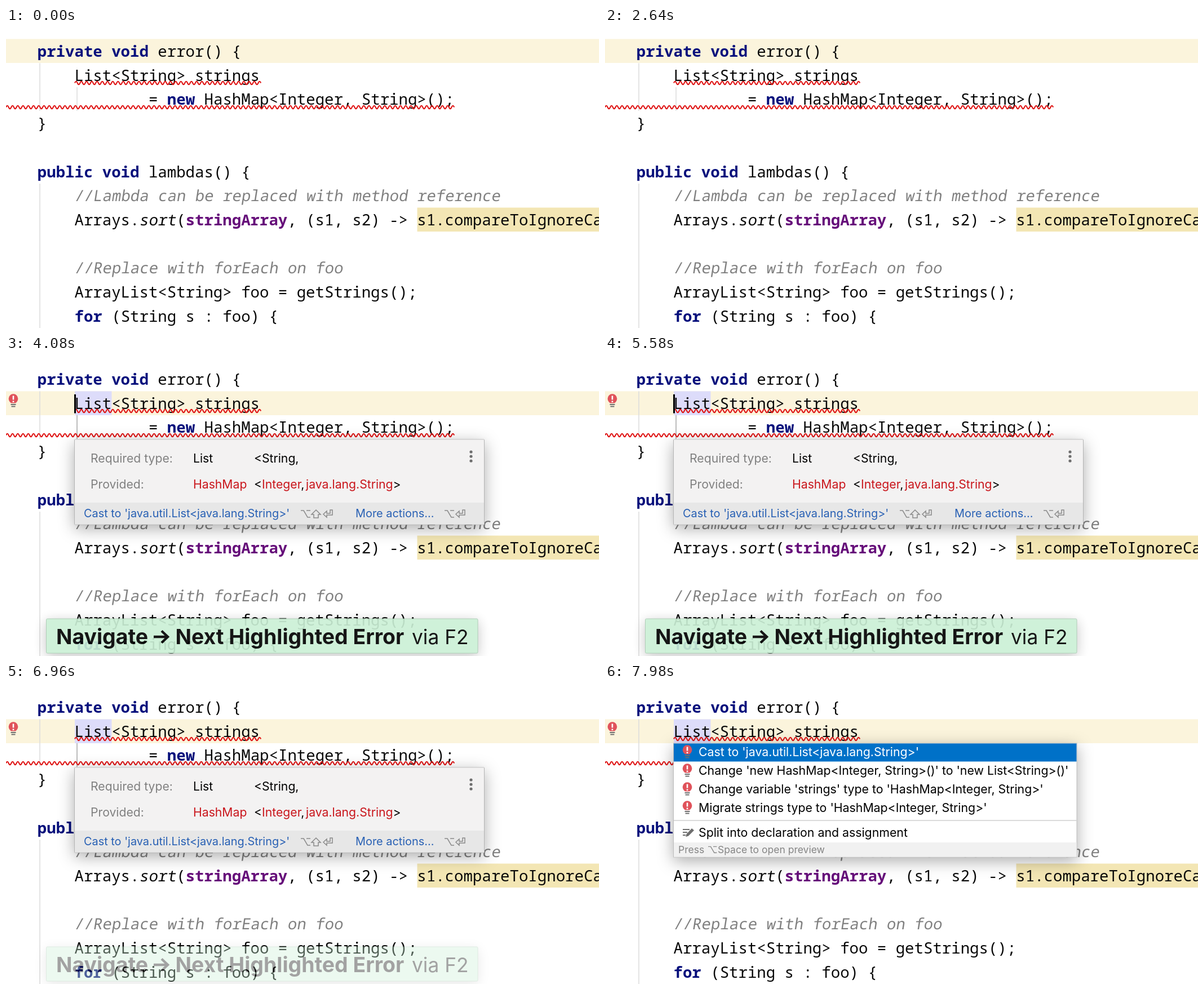
An HTML page that plays this animation: 1052 by 532 pixels, repeating every 8000 ms.

```html
<!DOCTYPE html>
<html lang="en">
<head>
<meta charset="utf-8">
<title>Editor: next highlighted error</title>
<style>
  html, body { margin: 0; width: 100%; height: 100%; overflow: hidden; background: #fff; }
  svg { display: block; width: 1052px; height: 532px; }
  text { white-space: pre; font-family: Inter, "Open Sans", sans-serif; }
  #code text { font: 500 27.38px "Noto Sans Mono", "DejaVu Sans Mono", monospace; fill: #080808; }
  #code .k { font-weight: 700; fill: #07107c; }
  #code .f { font-weight: 700; fill: #660e7a; }
  #code .c { fill: #808080; }
  .guide { stroke: #dcdcdc; stroke-width: 1.5; }
  .wave { fill: none; stroke: #df1515; stroke-width: 2.1; }
  .popup { filter: drop-shadow(0 7px 14px rgba(0, 0, 0, .32)); }
  .keys { fill: none; stroke: #8a8a8a; stroke-width: 1.5; }
  #hint text { font-size: 21.2px; }
  #hint .link { font-size: 19.9px; fill: #2860b4; }
  .dim { fill: #808080; }
  .red { fill: #c9151b; }
  #menu text { font-size: 21.3px; }
  #menu .foot { font-size: 17.5px; fill: #858585; }
  #caption { filter: drop-shadow(0 5px 11px rgba(0, 0, 0, .25)); }
  #caption text { font-size: 37.4px; }
</style>
</head>
<body>
<svg viewBox="0 0 1052 532">
  <defs>
    <g id="bulb">
      <path d="M-8.3 -2.5a8.3 8.3 0 0 1 16.6 0q0 4.5-4.3 8h-8q-4.3-3.5-4.3-8z" fill="#e0525a"/>
      <path d="M0-7.5v7M0 1.5v2.5" stroke="#fff" stroke-width="2.6"/>
      <path d="M-4.5 8h9M-3.5 11.5h7" stroke="#6e6e6e" stroke-width="1.8"/>
    </g>
    <path id="opt" d="M0 1h5l7 12h5M10 1h7"/>
    <path id="shift" d="M9 0l8 8h-4v6h-8v-6h-4z"/>
    <path id="enter" d="M17 0v9h-10v4l-6-5.5 6-5.5v4h6v-6z"/>
  </defs>

  <rect id="row" width="1052" height="42.5" fill="#fbf4dc"/>
  <rect x="729.5" y="318.5" width="323" height="42.5" fill="#f3e6b4"/>
  <rect id="word" x="122" y="62.5" width="65.5" height="42.5" fill="#dddcfa"/>
  <path class="guide" d="M60 62.5V147M60 276V532"/>
  <path class="guide" id="inner" d="M126 105V147"/>

  <g id="code">
    <text x="55.8" y="51"><tspan class="k">private void</tspan> error() {</text>
    <text x="121.5" y="93.7">List&lt;String&gt; strings</text>
    <text x="253" y="136.4">= <tspan class="k">new</tspan> HashMap&lt;Integer, String&gt;();</text>
    <text x="55.8" y="179.1">}</text>
    <text x="55.8" y="264.5"><tspan class="k">public void</tspan> lambdas() {</text>
    <text transform="translate(121 307.2) skewX(-9)" class="c">//Lambda can be replaced with method reference</text>
    <text x="121.5" y="349.9">Arrays.</text>
    <text transform="translate(236 349.9) skewX(-9)">sort</text>
    <text x="302.2" y="349.9">(<tspan class="f">stringArray</tspan>, (s1, s2) -&gt; s1.compareToIgnoreCase</text>
    <text transform="translate(121 435.3) skewX(-9)" class="c">//Replace with forEach on foo</text>
    <text x="121.5" y="478">ArrayList&lt;String&gt; foo = getStrings();</text>
    <text x="121.5" y="520.7"><tspan class="k">for</tspan> (String s : foo) {</text>
  </g>
  <path class="wave" id="wave1"/>
  <path class="wave" id="wave2"/>
  <rect id="caret" x="121" y="68" width="3" height="33.5"/>
  <use id="mark" href="#bulb" x="13" y="78"/>

  <g id="hint">
    <rect class="popup" x="121.5" y="148" width="727" height="151" rx="1" fill="#ececec" stroke="#b4b4b4"/>
    <g id="details">
      <rect x="122" y="148.5" width="726" height="112" fill="#f3f2f2"/>
      <rect x="122" y="260" width="726" height="38.5" fill="#e7e7e7"/>
      <text x="150" y="189" class="dim">Required type:</text>
      <text x="332" y="189">List</text>
      <text x="440" y="189">&lt;String,</text>
      <text x="150" y="235" class="dim">Provided:</text>
      <text x="332" y="235" class="red">HashMap</text>
      <text x="440" y="235">&lt;<tspan class="red">Integer</tspan>,</text>
      <text x="532" y="235"><tspan class="red">java.lang.String</tspan>&gt;</text>
      <text x="138" y="286" class="link">Cast to 'java.util.List&lt;java.lang.String&gt;'</text>
      <text x="620" y="286" class="link">More actions...</text>
      <g class="keys">
        <use href="#opt" x="523" y="273"/>
        <use href="#shift" x="541" y="273"/>
        <use href="#enter" x="562" y="273"/>
        <use href="#opt" x="778" y="273"/>
        <use href="#enter" x="797" y="273"/>
      </g>
      <g fill="#6e6e6e">
        <circle cx="825" cy="170" r="2.6"/>
        <circle cx="825" cy="178" r="2.6"/>
        <circle cx="825" cy="186" r="2.6"/>
      </g>
    </g>
  </g>

  <g id="caption">
    <rect x="71.5" y="466" width="765.5" height="61" rx="2" fill="#cbf0d6" stroke="#a9c9b2"/>
    <text x="89" y="511" font-weight="700">Navigate</text>
    <path d="M262 498h24M276 487.5l11 10.5-11 10.5" fill="none" stroke="#000" stroke-width="4.4"/>
    <text x="300.5" y="511" font-weight="700">Next Highlighted Error</text>
    <text x="720" y="511" style="font-size:35.3px">via F2</text>
  </g>

  <g id="menu">
    <rect class="popup" x="121.5" y="105" width="715.5" height="202" fill="#fff" stroke="#bdbdbd"/>
    <rect x="122" y="105.5" width="714.5" height="32" fill="#0071c8"/>
    <path d="M122 242H836.5" stroke="#cfcfcf" stroke-width="1.6"/>
    <rect x="122" y="281" width="714.5" height="25.5" fill="#f1f1f1"/>
    <use href="#bulb" x="146" y="119"/>
    <use href="#bulb" x="146" y="152"/>
    <use href="#bulb" x="146" y="185"/>
    <use href="#bulb" x="146" y="218"/>
    <path d="M138 258h12M138 263h8M138 268h5" stroke="#6e6e6e" stroke-width="1.9"/>
    <path d="M154 256l4 3.5-10 10-5 1.5 1.5-5z" fill="#6e6e6e"/>
    <text x="166" y="128" fill="#fff">Cast to 'java.util.List&lt;java.lang.String&gt;'</text>
    <text x="166" y="161">Change 'new HashMap&lt;Integer, String&gt;()' to 'new List&lt;String&gt;()'</text>
    <text x="166" y="194">Change variable 'strings' type to 'HashMap&lt;Integer, String&gt;'</text>
    <text x="166" y="227">Migrate strings type to 'HashMap&lt;Integer, String&gt;'</text>
    <text x="166" y="271">Split into declaration and assignment</text>
    <text x="130" y="300" class="foot">Press</text>
    <use href="#opt" class="keys" transform="translate(183 287.5) scale(.9)"/>
    <text x="200" y="300" class="foot">Space to open preview</text>
  </g>
</svg>
<script>
  const LOOP = 8000, MOVE = 3180, CLOSE = 7080, MENU = 7980, BLINK = 960;
  const el = id => document.getElementById(id);
  const show = (id, on) => el(id).style.display = on ? '' : 'none';
  const clamp = v => Math.max(0, Math.min(1, v));
  const wave = (x, y, width) =>
    `M${x} ${y}q2.325 -5.4 4.65 0` + 't4.65 0'.repeat(Math.round(width / 4.65) - 1);

  el('wave1').setAttribute('d', wave(122, 97.5, 328));
  el('wave2').setAttribute('d', wave(0, 140.5, 795));

  function draw(t) {
    const moved = t >= MOVE, hint = moved && t < CLOSE;
    el('row').setAttribute('y', moved ? 62.5 : 19.5);
    el('inner').style.stroke = moved ? '#a6a6a6' : '';
    show('word', t >= 3540);
    show('mark', t >= 3720 && t < CLOSE || t >= 7260);
    show('caret', moved && t < MENU && Math.floor((t - MOVE) / BLINK) % 2 === 0);
    show('hint', hint);
    show('details', t >= MOVE + 60);
    show('menu', t >= MENU);
    // The caption fades in after the jump and out before the hint closes.
    const alpha = .91 * clamp((t - 3240) / 300) * clamp((CLOSE - t) / 300);
    show('caption', alpha > 0);
    el('caption').style.opacity = alpha;
  }

  const start = performance.now();
  function tick() {
    draw((performance.now() - start) % LOOP);
    requestAnimationFrame(tick);
  }
  tick();
</script>
</body>
</html>
```
